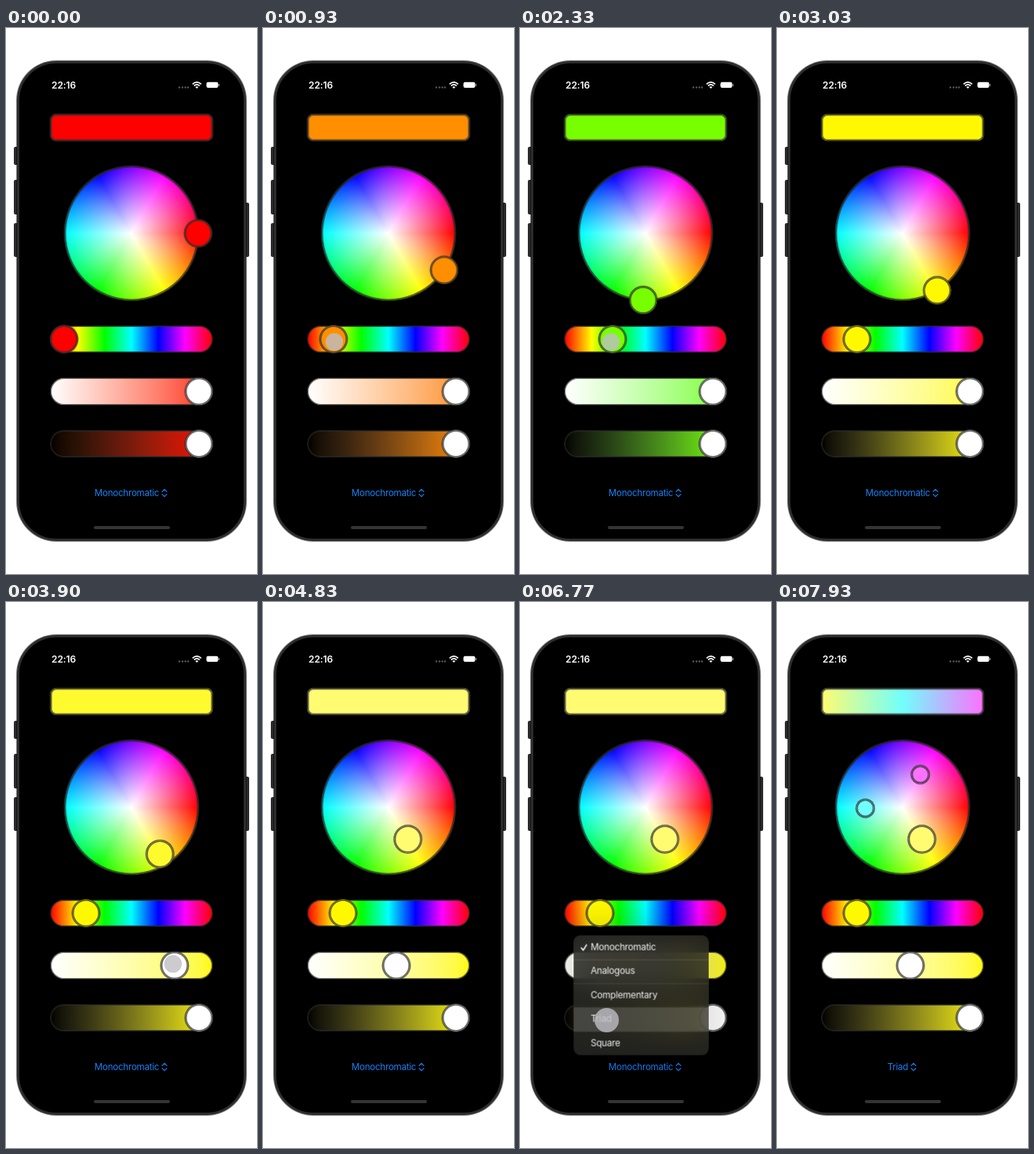
An HTML page for the animation above (8 s loop, 320 px wide and 694 px high).

```html
<!DOCTYPE html>
<html lang="en">
<head>
<meta charset="utf-8">
<title>Color picker</title>
<style>
  :root {
    --line: rgba(45, 45, 45, .72);
    --spectrum: red, yellow, lime, cyan, blue, magenta, red;
    --hue: red;
  }
  html, body { margin: 0; width: 100%; height: 100%; overflow: hidden; background: #fff; }
  #stage {
    position: relative; width: 320px; height: 694px; overflow: hidden;
    font: 11.6px/16px Inter, Roboto, sans-serif; letter-spacing: -.25px;
  }
  #stage > *, .knob, #menu svg { position: absolute; box-sizing: border-box; }
  .side { background: #2b2b2d; width: 6px; border-radius: 2px; }
  #phone {
    left: 14px; top: 42px; width: 292px; height: 610px; border: 3.5px solid #2d2d2f; border-radius: 50px;
    background: #000; box-shadow: 0 0 0 1px rgba(0, 0, 0, .5);
  }
  #clock { left: 58px; top: 64.5px; color: #fff; font-weight: 600; font-size: 12px; letter-spacing: -.1px; }
  #status { left: 216px; top: 64px; }
  #home { left: 112px; top: 633px; width: 97px; height: 3.5px; border-radius: 2px; background: #343436; }

  .ring { box-shadow: inset 0 0 0 1.6px var(--line), 0 0 0 1.5px var(--line); }
  #swatch { left: 57px; top: 110px; width: 206px; height: 33px; border-radius: 7px; }
  #wheel {
    left: 75px; top: 176px; width: 170px; height: 170px; border-radius: 50%;
    background: radial-gradient(closest-side, #fff, #fff0), conic-gradient(from 90deg, var(--spectrum));
  }
  .track { left: 57px; width: 206px; height: 33.5px; border-radius: 17px; box-shadow: inset 0 0 0 1px var(--line), 0 0 0 .8px var(--line); }
  #hueTrack { top: 378.8px; background: linear-gradient(90deg, var(--spectrum)); }
  #satTrack { top: 445.2px; background: linear-gradient(90deg in oklab, #fff, var(--hue)); }
  #briTrack { top: 511.7px; background: linear-gradient(90deg in lab, #000, var(--hue)); }
  .knob { left: -17px; top: -17px; width: 34px; height: 34px; border-radius: 50%; background: #fff; }
  .small { left: -11px; top: -11px; width: 22px; height: 22px; }

  #label { left: 0; top: 582.5px; width: 319px; display: flex; justify-content: center; align-items: center; gap: 3px; color: #1680f5; }
  #menu, #shade { left: 67px; top: 421px; width: 175px; height: 154.5px; border-radius: 9px; }
  #menu {
    overflow: hidden; transform-origin: 88px 169px; color: #f2f2f2; font-size: 11.9px;
    background: rgba(40, 40, 38, .83); backdrop-filter: blur(22px) saturate(1.5);
  }
  #shade { box-shadow: 0 0 30px 20px rgba(0, 0, 0, .1); }
  #menu div { height: 30.9px; line-height: 29.8px; padding-left: 22px; }
  #menu div + div { background: linear-gradient(rgba(255, 255, 255, .09) 1px, transparent 1px); }
  #menu svg { left: 9px; top: 10.5px; }
  #touch { left: -16px; top: -16px; width: 32px; height: 32px; border-radius: 50%; background: rgba(190, 190, 196, .8); }
</style>
</head>
<body>
<div id="stage">
  <div class="side" style="left:10px;top:151px;height:23px"></div>
  <div class="side" style="left:10px;top:193px;height:44px"></div>
  <div class="side" style="left:10px;top:248px;height:43px"></div>
  <div class="side" style="left:304px;top:222px;height:69px"></div>
  <div id="phone"></div>
  <div id="clock">22:16</div>
  <svg id="status" width="60" height="16">
    <g fill="#555"><circle cx="5" cy="11.5" r="1.2"/><circle cx="9" cy="11.5" r="1.2"/><circle cx="12.7" cy="11.5" r="1.2"/><circle cx="16" cy="11.5" r="1.2"/></g>
    <g fill="none" stroke="#fff" stroke-width="1.7"><path d="M21.8 7.4Q27.3 2.4 32.8 7.4M23.8 9.5Q27.3 6.4 30.8 9.5"/></g>
    <path d="M25.3 11Q27.3 9.4 29.3 11L27.3 13Z" fill="#fff"/>
    <rect x="39.5" y="4.8" width="15" height="7.2" rx="2.2" fill="#fff"/>
    <path d="M55.6 7v3" stroke="#888" stroke-width="1.2"/>
  </svg>
  <div id="swatch" class="ring"></div>
  <div id="wheel" class="ring"></div>
  <div id="third" class="knob small ring"></div>
  <div id="second" class="knob small ring"></div>
  <div id="main" class="knob ring"></div>
  <div id="hueTrack" class="track"></div>
  <div id="satTrack" class="track"></div>
  <div id="briTrack" class="track"></div>
  <div id="hueKnob" class="knob ring"></div>
  <div id="satKnob" class="knob ring"></div>
  <div id="briKnob" class="knob ring"></div>
  <div id="label"><span id="scheme">Monochromatic</span>
    <svg width="8" height="12" fill="none" stroke="currentColor" stroke-width="1.2" stroke-linecap="round" stroke-linejoin="round"><path d="M1 4.3L4 1.3L7 4.3M1 7.7L4 10.7L7 7.7"/></svg>
  </div>
  <div id="shade"></div>
  <div id="menu">
    <svg width="10" height="10" fill="none" stroke="#fff" stroke-width="1.5" stroke-linecap="round" stroke-linejoin="round"><path d="M1 5.3L3.4 8.3L7.8 1.3"/></svg>
    <div>Monochromatic</div><div>Analogous</div><div>Complementary</div><div id="triad">Triad</div><div>Square</div>
  </div>
  <div id="home"></div>
  <div id="touch"></div>
</div>
<script>
  const LOOP = 8000;
  const SELECT = 6800;
  const $ = id => document.getElementById(id);

  // Piecewise linear value through [time, value] pairs.
  function along(t, keys) {
    if (t <= keys[0][0]) return keys[0][1];
    for (let i = 1; i < keys.length; i++) {
      const [t0, a] = keys[i - 1], [t1, b] = keys[i];
      if (t < t1) return a + (b - a) * (t - t0) / (t1 - t0);
    }
    return keys[keys.length - 1][1];
  }
  const smooth = (t, from, to) => {
    const u = Math.min(1, Math.max(0, (t - from) / (to - from)));
    return u * u * (3 - 2 * u);
  };
  const place = (id, x, y, scale = 1) => {
    $(id).style.transform = `translate(${x}px, ${y}px) scale(${scale})`;
  };
  const color = (hue, sat) => `hsl(${hue} 100% ${100 - 50 * sat}%)`;

  const hueX = [[480, 74], [1470, 109], [1900, 126], [2010, 126], [2330, 118], [2740, 102]];
  const satX = [[3620, 246], [3900, 215], [4250, 184], [4600, 170]];

  // Each press: visible span, position and size.
  const presses = [
    { on: 320, off: 2900, x: t => along(t, hueX) + along(t, [[1470, 1], [2330, -2]]), y: 399, size: .7 },
    { on: 3350, off: 4850, x: t => along(t, satX) + along(t, [[3620, -5], [3900, -2]]), y: 460, size: .7 },
    { on: 5180, off: 5900, x: () => 163.5, y: 586, size: .97, grow: true },
    { on: 6120, off: 7000, x: () => 110.5, y: 531.5, size: .97 }
  ];

  function drawHandle(id, hue, sat) {
    const a = hue * Math.PI / 180;
    place(id, 160 + 85 * sat * Math.cos(a), 261 + 85 * sat * Math.sin(a));
    $(id).style.background = color(hue, sat);
  }

  function drawMenu(t) {
    const open = smooth(t, 5340, 5600), close = smooth(t, 6740, 7090);
    const menu = $('menu'), alpha = smooth(t, 5340, 5500) * (1 - smooth(t, 6800, 7060));
    menu.style.transform = `scale(${(.3 + .7 * open) * (1 - .7 * close)})`;
    menu.style.opacity = $('shade').style.opacity = alpha;
    menu.style.visibility = alpha ? 'visible' : 'hidden';
    $('triad').style.background = t > 6560 ? 'rgba(255,255,255,.15)' : '';
    $('label').style.color = t > 5300 && t < 6740 ? '#5b9be0' : '';
  }

  function drawTouch(t) {
    const p = presses.find(p => t >= p.on && t < p.off);
    $('touch').style.opacity = p ? smooth(t, p.on, p.on + 200) * (1 - smooth(t, p.off - 200, p.off)) : 0;
    if (p) place('touch', p.x(t), p.y, p.size * (p.grow ? .75 + .25 * smooth(t, 5250, 5450) : 1));
  }

  function draw(t) {
    const hx = along(t, hueX), sx = along(t, satX);
    const hue = (hx - 74) / 172 * 360, sat = (sx - 74) / 172;
    const triad = t >= SELECT;
    const shades = [0, 120, 240].map(turn => color(hue + turn, sat));

    document.documentElement.style.setProperty('--hue', color(hue, 1));
    $('swatch').style.background = triad ? `linear-gradient(90deg, ${shades})` : shades[0];
    $('scheme').textContent = triad ? 'Triad' : 'Monochromatic';
    drawHandle('main', hue, sat);
    drawHandle('second', hue + 120, sat);
    drawHandle('third', hue + 240, sat);
    $('second').style.opacity = $('third').style.opacity = smooth(t, SELECT, SELECT + 250);

    place('hueKnob', hx, 395.5);
    $('hueKnob').style.background = color(hue, 1);
    place('satKnob', sx, 462);
    place('briKnob', 246, 528.5);
    drawMenu(t);
    drawTouch(t);
  }

  const start = performance.now();
  function frame() {
    draw((performance.now() - start) % LOOP);
    requestAnimationFrame(frame);
  }
  frame();
</script>
</body>
</html>
```
